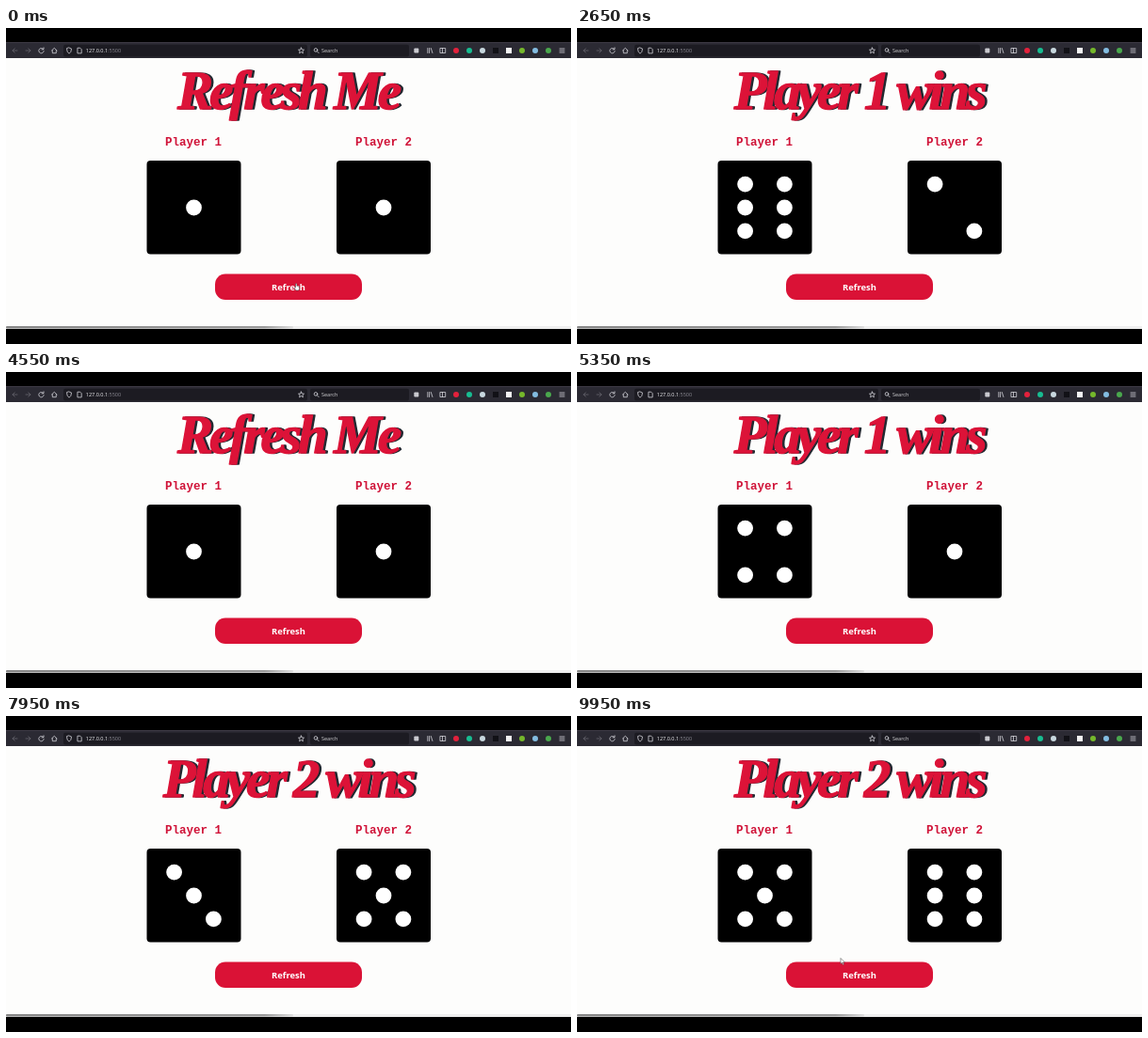
An HTML page that plays this animation: 600x336 px, repeating every 10 s.

```html
<!DOCTYPE html>
<html lang="en">
<head>
<meta charset="utf-8">
<title>Dice game</title>
<style>
  html, body { margin: 0; width: 100%; height: 100%; overflow: hidden; background: #000; }
  svg { display: block; width: 100%; height: 100%; }
  .title { font: italic bold 57px "Liberation Serif", Times, serif; letter-spacing: -4px; text-anchor: middle; stroke-width: 1.4; stroke-linejoin: round; }
  .label { font: bold 12.5px "Liberation Mono", "Courier New", monospace; fill: #d01338; text-anchor: middle; }
  .button { font: bold 9.4px "Open Sans", "Noto Sans", sans-serif; fill: #fff; text-anchor: middle; }
  .bar { font: 5.5px "Open Sans", "Noto Sans", sans-serif; fill: #f2f2f4; }
  .line { fill: none; stroke: #d4d4da; stroke-width: .8; stroke-linecap: round; stroke-linejoin: round; }
</style>
</head>
<body>
<svg viewBox="0 0 600 336">
  <defs>
    <linearGradient id="scroll">
      <stop offset="0" stop-color="#858585"/>
      <stop offset=".9" stop-color="#999"/>
      <stop offset="1" stop-color="#ddd"/>
    </linearGradient>
  </defs>
  <rect y="32" width="600" height="288" fill="#fdfdfc"/>
  <rect y="317" width="600" height="3" fill="#eee"/>
  <rect y="317" width="305" height="2.5" rx="1" fill="url(#scroll)"/>

  <!-- browser toolbar -->
  <rect y="15" width="600" height="17" fill="#2b2a33"/>
  <rect y="15" width="600" height=".8" fill="#43404c"/>
  <rect x="61" y="17.7" width="259" height="12.8" rx="2" fill="#1c1b22"/>
  <rect x="323" y="17.7" width="105" height="12.8" rx="2" fill="#1c1b22"/>
  <g class="line">
    <path d="M12 24H7m2.2-2.2L7 24l2.2 2.2M21 24h5m-2.2-2.2L26 24l-2.2 2.2" stroke="#66656d"/>
    <path d="M39.6 22.4a2.7 2.7 0 1 0 .6 2.2M40 20.8v2h-2M48.5 24l2.8-2.7 2.8 2.7M49.3 23.7v3h4v-3"/>
    <path d="M67 21l2.5 1q0 4-2.5 5.2Q64.500 26 64.500 22zM76.300 21.200h2.400l1.500 1.500v4.200h-3.900z"/>
    <path d="M313.500 21l.9 2 2.100.2-1.600 1.400.5 2.200-1.900-1.200-1.900 1.200.5-2.200-1.600-1.400 2.100-.2z"/>
    <circle cx="329" cy="23.400" r="1.800"/>
    <path d="M330.400 24.800l1.700 1.800"/>
    <path d="M447.800 21.500v5M449.600 21.500v5M451.300 21.500l1.600 5M461.300 21.500h5.400v5h-5.400zM463.500 21.500v5M588 22h5m-5 2h5m-5 2h5"/>
  </g>
  <text class="bar" x="84.800" y="26">127.0.0.1<tspan fill="#8b8a93">:5500</tspan></text>
  <text class="bar" x="335" y="26" fill-opacity=".85">Search</text>
  <rect x="433.300" y="21.500" width="5" height="5" rx="1" fill="#c9c9cf"/>
  <g id="addons"></g>

  <text class="title" x="301.500" y="86" fill="#232931" stroke="#232931"></text>
  <text class="title" x="299" y="86" fill="#dc1338" stroke="#dc1338"></text>

  <text class="label" x="199" y="125">Player 1</text>
  <text class="label" x="401" y="125">Player 2</text>
  <g id="dice"></g>

  <rect x="222" y="261.500" width="156" height="27.500" rx="11" fill="#da1236"/>
  <text class="button" x="300" y="279">Refresh</text>

  <path id="hand" d="M-1 0q.8-1 1.400 0v2.400l2.600.7v2.400l-.8 1.500h-2.700l-2-2.700q.2-.9 1.500-.2z" fill="#fff" stroke="#333" stroke-width=".5"/>
  <path id="arrow" d="M0 0v6l1.400-1.200 1 2.200 1-.5-1-2 1.900-.2z" fill="#fff" stroke="#555" stroke-width=".6"/>
</svg>
<script>
const LOOP = 10000, FLASH = 150;

// start time, left die, right die
const rolls = [
  [0, 2, 2], [1400, 5, 3], [2450, 6, 2], [3200, 2, 5], [3700, 1, 1], [4550, 4, 1],
  [5450, 2, 6], [6100, 4, 2], [6900, 1, 3], [7600, 3, 5], [8400, 6, 4], [9150, 5, 6]
];

// column, row, and the rule for showing each pip
const pips = [
  [0, 0, v => v % 2],
  [-1, -1, v => v > 1], [1, 1, v => v > 1],
  [1, -1, v => v > 3], [-1, 1, v => v > 3],
  [-1, 0, v => v === 6], [1, 0, v => v === 6]
];

const byId = id => document.getElementById(id);

function add(parent, tag, attrs) {
  const node = document.createElementNS("http://www.w3.org/2000/svg", tag);
  for (const key in attrs) node.setAttribute(key, attrs[key]);
  return parent.appendChild(node);
}

function makeDie(cx) {
  const group = byId("dice");
  add(group, "rect", { x: cx - 50, y: 141, width: 100, height: 99.5, rx: 4, fill: "#000" });
  const dots = pips.map(([col, row]) =>
    add(group, "circle", { cx: cx + col * 20.9, cy: 191 + row * 24.9, r: 8.4, fill: "#fff" }));
  return value => dots.forEach((dot, i) =>
    dot.setAttribute("visibility", pips[i][2](value) ? "visible" : "hidden"));
}

const addonColors = ["#e3213c", "#18bd91", "#c8d8df", "#111116", "#f4f4f4", "#75b82b", "#83bce0", "#4aa84d"];
addonColors.forEach((fill, i) => {
  const x = 478 + i * 14;
  if (i === 3 || i === 4) add(byId("addons"), "rect", { x: x - 3, y: 21, width: 6, height: 6, fill });
  else add(byId("addons"), "circle", { cx: x, cy: 24, r: 3, fill });
});

const setLeft = makeDie(199.5), setRight = makeDie(401);
const titles = document.querySelectorAll(".title");

function place(id, shown, x, y) {
  byId(id).setAttribute("visibility", shown ? "visible" : "hidden");
  byId(id).setAttribute("transform", `translate(${x} ${y})`);
}

function draw(t) {
  const [start, a, b] = rolls.findLast(roll => roll[0] <= t);
  const loading = t - start < FLASH;
  const text = loading ? "Refresh Me" : a === b ? "Draw" : `Player ${a > b ? 1 : 2} wins`;
  titles.forEach(title => title.textContent = text);
  setLeft(loading ? 1 : a);
  setRight(loading ? 1 : b);

  const drift = Math.min(t / 1400, 1);
  place("hand", t < 2400, 308.5 - 5 * drift, 272 + 2.5 * drift);
  const exit = (t - 9600) / 350;
  place("arrow", exit >= 0, 286 - 6 * exit, 264 - 6.5 * exit);
}

function tick() {
  draw(performance.now() % LOOP);
  requestAnimationFrame(tick);
}
tick();
</script>
</body>
</html>
```
